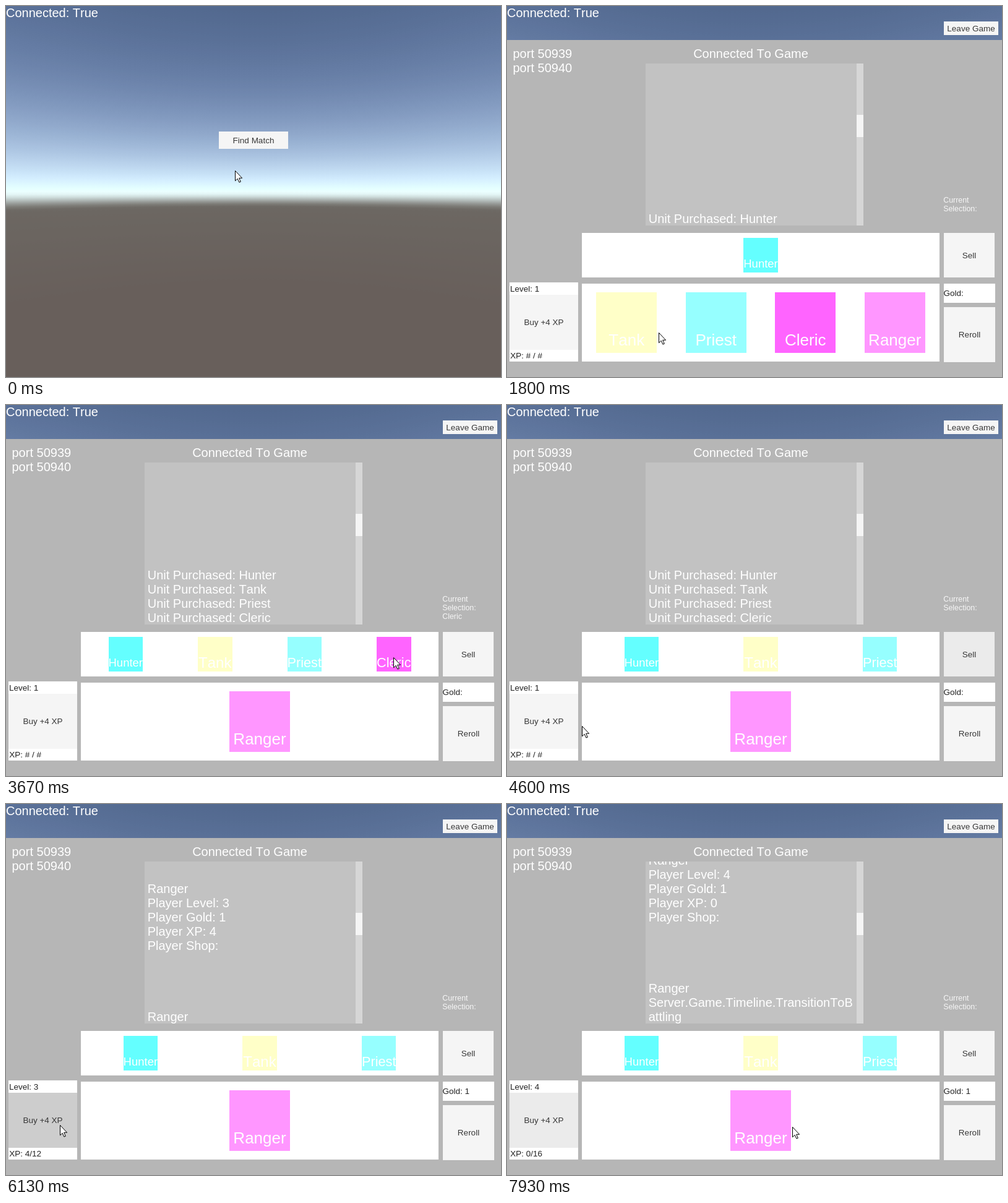
Recreate the animation shown at these times as an HTML page with a canvas. Size 800 by 600 pixels, loop 8 s.

```html
<!DOCTYPE html>
<html lang="en">
<head>
<meta charset="utf-8">
<title>Auto battler lobby</title>
<style>
  html, body { margin: 0; width: 100%; height: 100%; overflow: hidden; }
  canvas { display: block; }
</style>
</head>
<body>
<canvas id="stage" width="800" height="600"></canvas>
<script>
const LOOP = 8000, GAME_START = 640, FIND_CLICK = 470;
const SELECT_AT = 3640, SELL_CLICK = 4000, SOLD_AT = 4080;
const BUY_CLICKS = Array.from({ length: 5 }, (_, i) => 4800 + 400 * i);
const ROUND_END = 7530, REPLY_DELAY = 130;

const UNITS = [
  { name: 'Hunter', color: '#64ffff', bought: 1530 },
  { name: 'Tank', color: '#ffffc8', bought: 2270 },
  { name: 'Priest', color: '#96ffff', bought: 2520 },
  { name: 'Cleric', color: '#ff64ff', bought: 3080, sold: SOLD_AT },
  { name: 'Ranger', color: '#ff96ff', bought: Infinity }
];

// Cursor moves: start, end, x, y
const MOVES = [
  [70, 400, 378, 216], [930, 1400, 195, 522], [1550, 1750, 245, 528], [2000, 2250, 222, 535],
  [2560, 2800, 267, 542], [3100, 3400, 626, 408], [3700, 3950, 757, 405], [4100, 4450, 121, 519],
  [4650, 4800, 87, 519], [6530, 6870, 388, 539], [7330, 7900, 461, 522]
];

const ctx = document.getElementById('stage').getContext('2d');
ctx.fontKerning = 'none';

const clamp = v => Math.min(1, Math.max(0, v));
const smooth = p => p * p * (3 - 2 * p);
const mix = (a, b, p) => a + (b - a) * p;

// Every +4 XP fills the bar or raises the level, which needs four more
let player = { level: 1, xp: 0 };
const levels = [...BUY_CLICKS.map(c => c + REPLY_DELAY), ROUND_END].map(at => {
  const { level, xp } = player, full = xp + 4 >= 4 * level;
  player = full ? { level: level + 1, xp: 0 } : { level, xp: xp + 4 };
  return { at, ...player };
});

const log = [
  ...UNITS.map(u => [u.bought, 'Unit Purchased: ' + u.name]),
  ...levels.map(({ at, level, xp }) => [at,
    `Player Level: ${level}\nPlayer Gold: 1\nPlayer XP: ${xp}\nPlayer Shop:\n\n\n\n\nRanger`]),
  [ROUND_END, 'Server.Game.Timeline.TransitionToB\nattling']
];

function rect(x, y, w, h, color) {
  ctx.fillStyle = color;
  ctx.fillRect(x, y, w, h);
}

function setFont(size) {
  ctx.font = `${size}px "Liberation Sans", Arial, sans-serif`;
}

// Text whose capitals are centred on cy
function text(str, x, cy, size = 20, color = '#fff', align = 'left') {
  setFont(size);
  ctx.textAlign = align;
  ctx.fillStyle = color;
  ctx.fillText(str, x, Math.round(cy + size * 0.344));
}

const label = (str, x, cy) => text(str, x, cy, 13.5, '#222');

function button(str, x, y, w, h, shade = 245) {
  rect(x, y, w, h, `rgb(${shade},${shade},${shade})`);
  text(str, x + w / 2, y + h / 2, 13.5, '#383838', 'center');
}

// Grey of a button: darker while hovered or selected, with a short dip per click
function shadeAt(t, from, to, clicks) {
  const active = clamp((t - from) / 100) - clamp((t - to) / 100);
  const dip = Math.max(...clicks.map(c => clamp(1 - Math.abs(t - c - 100) / 100)));
  return Math.round(245 - 10 * active - 43 * dip);
}

// Evenly spread cards; each name shrinks to fit its card
function cards(units, size, top, textY, maxFont) {
  units.forEach(({ name, color }, i) => {
    const cx = 121 + 578 * (i + 0.5) / units.length;
    const left = Math.round(cx - size / 2), right = Math.round(cx + size / 2);
    rect(left, top, right - left, Math.round(size), color);
    setFont(100);
    text(name, cx, textY, Math.min(maxFont, 100 * size / ctx.measureText(name).width), '#fff', 'center');
  });
}

function skyColor(y) {
  const height = Math.max(0, 300 - y);
  const haze = Math.exp(-height / 115), blueHaze = Math.exp(-height / 150);
  const air = [70 + 165 * haze, 92 + 170 * haze, 122 + 150 * blueHaze];
  const depth = clamp((y - 325) / 125), fade = smooth(clamp((y - 300) / 26));
  const ground = [mix(108, 104, depth), mix(103, 95, depth), mix(98, 91, depth)];
  return `rgb(${air.map((a, i) => Math.round(mix(Math.min(255, a), ground[i], fade)))})`;
}

function makeSky() {
  const sky = document.createElement('canvas');
  sky.width = 800;
  sky.height = 600;
  const c = sky.getContext('2d');
  const fill = c.createLinearGradient(0, 0, 0, 600);
  for (let y = 0; y <= 600; y += 4) fill.addColorStop(y / 600, skyColor(y));
  c.fillStyle = fill;
  // Lines of equal elevation bend away from the horizon towards the sides
  for (let x = 0; x < 800; x++) {
    const stretch = Math.hypot(1, (x - 400) / 520);
    c.setTransform(1, 0, 0, stretch, 0, 300 * (1 - stretch));
    c.fillRect(x, 0, 1, 600);
  }
  return sky;
}
const sky = makeSky();

function drawLog(t) {
  rect(224, 93, 341, 262, '#c2c2c2');
  rect(565, 93, 11, 262, '#d6d6d6');
  rect(565, 176, 11, 36, '#f5f5f5');
  const lines = log.filter(([at]) => t >= at).flatMap(([, str]) => str.split('\n')).slice(-12);
  ctx.save();
  ctx.beginPath();
  ctx.rect(224, 93, 341, 262);
  ctx.clip();
  lines.reverse().forEach((line, i) => text(line, 228.7, 344 - 23 * i));
  ctx.restore();
}

function drawGame(t) {
  rect(0, 55, 800, 545, '#b6b6b6');
  button('Leave Game', 706, 25, 88, 22);
  text('port 50939', 9.5, 77);
  text('port 50940', 9.5, 100);
  text('Connected To Game', 394, 77, 20, '#fff', 'center');
  drawLog(t);

  const selected = t >= SELECT_AT && t < SOLD_AT ? 'Cleric' : '';
  ['Current', 'Selection:', selected].forEach((str, i) => text(str, 705.2, 314 + 14 * i, 12.4, '#f6f6f6'));

  rect(121, 367, 578, 72, '#fff');
  cards(UNITS.filter(u => t >= u.bought && !(t >= u.sold)), 55.5, 375, 416.5, 24);
  rect(121, 449, 578, 126, '#fff');
  cards(UNITS.filter(u => t < u.bought), 97.6, 463, 540, 26);

  button('Sell', 706, 367, 82, 72, shadeAt(t, 3850, BUY_CLICKS[0], [SELL_CLICK]));
  button('Reroll', 706, 487, 83, 89);

  const now = levels.filter(l => t >= l.at).pop();
  rect(706, 449, 83, 31, '#fff');
  label(now ? 'Gold: 1' : 'Gold:', 705.5, 464.5);
  rect(4, 447, 111, 128, '#fff');
  label('Level: ' + (now ? now.level : 1), 5, 457.5);
  button('Buy +4 XP', 4, 467, 111, 89, shadeAt(t, 4700, LOOP, BUY_CLICKS));
  label('XP: ' + (now ? `${now.xp}/${4 * now.level}` : '# / #'), 5.3, 565.5);
}

const arrow = new Path2D('M.5 .5V16.8L4.2 13.3L6.9 19.2L9.3 18.2L6.7 12.3H11.6Z');
function drawCursor(t) {
  let x = 370, y = 266;
  for (const [start, end, toX, toY] of MOVES) {
    const p = smooth(clamp((t - start) / (end - start)));
    x = mix(x, toX, p);
    y = mix(y, toY, p);
  }
  ctx.save();
  ctx.translate(Math.round(x), Math.round(y));
  ctx.fillStyle = '#fff';
  ctx.fill(arrow);
  ctx.strokeStyle = '#000';
  ctx.stroke(arrow);
  ctx.restore();
}

function draw(t) {
  ctx.drawImage(sky, 0, 0);
  text('Connected: True', 0, 11.5);
  if (t < GAME_START) button('Find Match', 344, 203, 112, 28, shadeAt(t, 300, LOOP, [FIND_CLICK]));
  else drawGame(t);
  drawCursor(t);
}

const start = performance.now();
function tick() {
  draw((performance.now() - start) % LOOP);
  requestAnimationFrame(tick);
}
tick();
</script>
</body>
</html>
```
